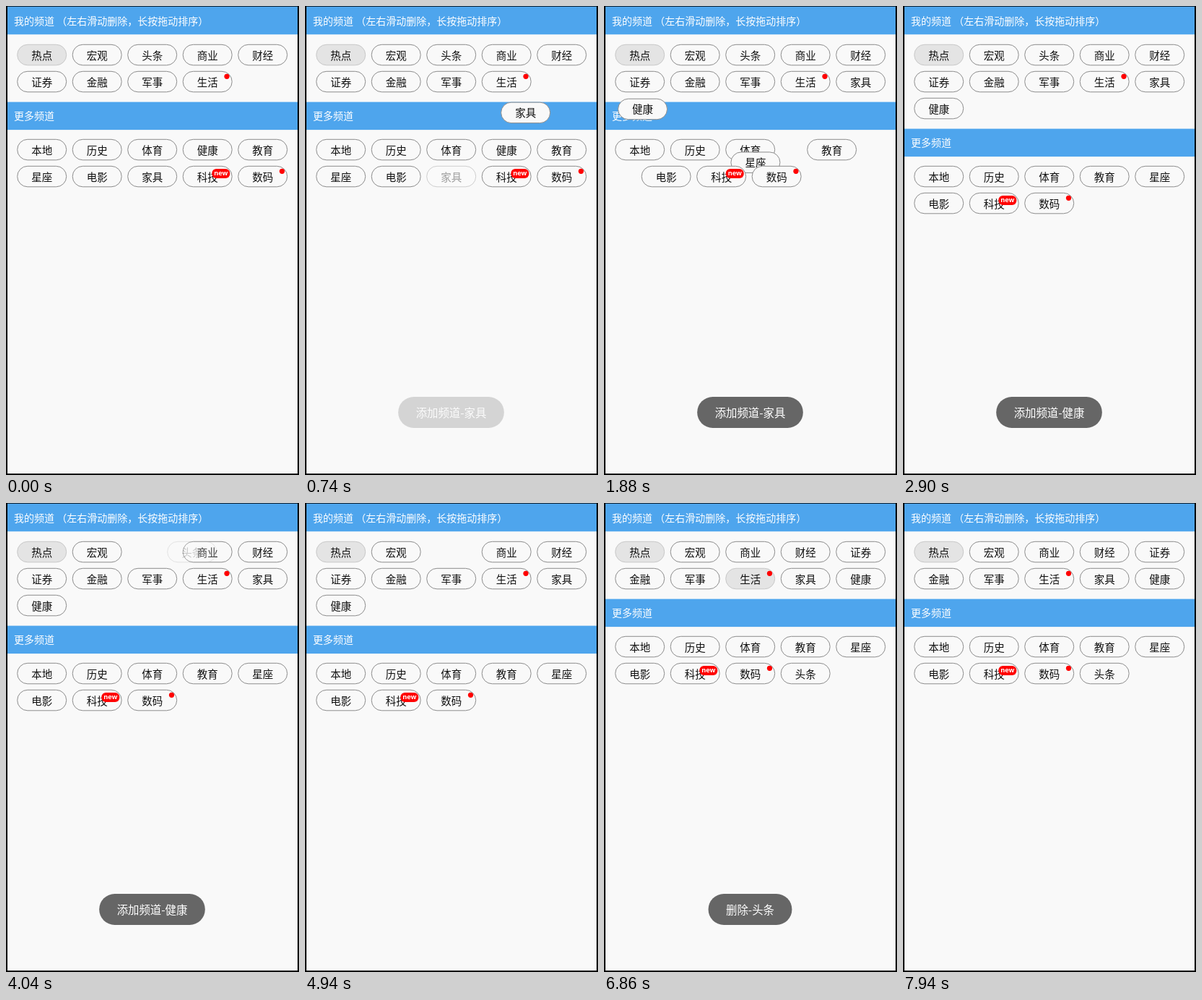
Recreate the animation shown at these times as an HTML page with a canvas. Size 406 by 648 pixels, loop 8 s.

```html
<!DOCTYPE html>
<html lang="zh-CN">
<head>
<meta charset="utf-8">
<style>
html, body { margin: 0; height: 100%; overflow: hidden; background: #000; }
canvas { display: block; }
</style>
</head>
<body>
<canvas id="stage" width="406" height="648"></canvas>
<script>
const ctx = document.getElementById('stage').getContext('2d');
const LOOP = 8000, FADE = 120, MOVE = 400;
const CHIP_W = 69, CHIP_H = 29.5, MY_TOP = 52.8, HEADER_H = 38.5;
const BG = '#f9f9f9', BLUE = '#4ea5ed', RED = '#f00';
const FONT = '"Noto Sans CJK SC", "Noto Sans CJK", sans-serif';

const words = s => s.split(' ');
// Each stage: start time and the list's contents from then on.
const mine = [
  [0, words('热点 宏观 头条 商业 财经 证券 金融 军事 生活')],
  [896, words('热点 宏观 头条 商业 财经 证券 金融 军事 生活 家具')],
  [1914, words('热点 宏观 头条 商业 财经 证券 金融 军事 生活 家具 健康')],
  [5420, words('热点 宏观 商业 财经 证券 金融 军事 生活 家具 健康')],
];
const more = [
  [0, words('本地 历史 体育 健康 教育 星座 电影 家具 科技 数码')],
  [673, words('本地 历史 体育 健康 教育 星座 电影 科技 数码')],
  [1555, words('本地 历史 体育 教育 星座 电影 科技 数码')],
  [5420, words('本地 历史 体育 教育 星座 电影 科技 数码 头条')],
];

const progress = (t, start, length) => Math.min(1, Math.max(0, (t - start) / length));
const ease = p => (1 - Math.cos(Math.PI * p)) / 2;
const mix = (a, b, p) => a + (b - a) * p;
const between = (a, b, p) => [mix(a[0], b[0], p), mix(a[1], b[1], p)];
const slot = (i, top) => [15.2 + 76.5 * (i % 5), top + 37 * Math.floor(i / 5)];
const headerTop = rows => 58.6 + 37 * rows;
const moreTop = rows => headerTop(rows) + 51.2;

function pill(x, y, w, h, r, fill, stroke) {
  ctx.beginPath();
  ctx.roundRect(x, y, w, h, r);
  ctx.fillStyle = fill;
  ctx.fill();
  if (stroke) {
    ctx.strokeStyle = stroke;
    ctx.stroke();
  }
}

function text(s, x, y, size, color, align = 'center', font = FONT, weight = 400) {
  ctx.font = `${weight} ${size}px ${font}`;
  ctx.textAlign = align;
  ctx.fillStyle = color;
  ctx.fillText(s, x, y + size * 0.38);
}

function chip(name, [x, y], alpha = 1, pressed = false) {
  const grey = pressed || name === '热点';
  ctx.globalAlpha = alpha;
  pill(x + 0.5, y + 0.5, CHIP_W - 1, CHIP_H - 1, 14.2, grey ? '#e4e4e4' : BG, grey ? '#c8c8c8' : '#8c8c8c');
  text(name, x + 34.5, y + 15.2, 14.5, '#111');
  if (name === '生活' || name === '数码') {
    ctx.beginPath();
    ctx.arc(x + 61.3, y + 7.5, 3.6, 0, 7);
    ctx.fillStyle = RED;
    ctx.fill();
  }
  if (name === '科技') {
    pill(x + 40.6, y + 4.1, 25, 13, 6, RED);
    text('new', x + 53.1, y + 9.6, 9.2, '#fff', 'center', '"Noto Sans", sans-serif', 600);
  }
  ctx.globalAlpha = 1;
}

function header(label, y) {
  ctx.fillStyle = BLUE;
  ctx.fillRect(2, y, 402, HEADER_H);
  text(label, 11, y + 19.4, 14, '#fff', 'left');
}

const stageAt = (stages, t) => stages.findLastIndex(s => s[0] <= t);

// Removed chips fade out first, then the others slide to their new slots.
function list(stages, t, top, hidden, pressed) {
  const i = stageAt(stages, t), [start, now] = stages[i];
  const before = i ? stages[i - 1][1] : now;
  const removed = before.filter(n => !now.includes(n));
  const p = ease(progress(t, start + FADE, MOVE));
  const fade = 1 - ease(progress(t, start, FADE));
  for (const name of removed)
    if (name !== hidden && fade > 0) chip(name, slot(before.indexOf(name), top), fade);
  now.forEach((name, to) => {
    if (name === hidden) return;
    const from = before.includes(name) ? before.indexOf(name) : to;
    chip(name, between(slot(from, top), slot(to, top), p), 1, name === pressed);
  });
}

function fly(name, t, start, from, to) {
  if (t < start || t >= start + MOVE) return;
  chip(name, between(slot(from, moreTop(2)), slot(to, MY_TOP), ease(progress(t, start, MOVE))));
}

function swipe(t) {
  if (t < 3590 || t > 4700) return;
  const dx = 55 * ease(progress(t, 3590, 450)) + 14 * progress(t, 4430, 220);
  const [x, y] = slot(2, MY_TOP);
  chip('头条', [x + dx, y], 1 - dx / CHIP_W);
}

// The label stays white while the dark pill fades against the light page.
function toast(label, alpha, labelAlpha = 1) {
  if (alpha <= 0) return;
  ctx.font = `15.4px ${FONT}`;
  const w = ctx.measureText(label).width + 49;
  ctx.globalAlpha = alpha;
  pill(202.5 - w / 2, 540, w, 43, 21.5, '#666');
  ctx.globalAlpha = labelAlpha;
  text(label, 202.5, 562, 15.4, mixedWhite(alpha));
  ctx.globalAlpha = 1;
}

const mixedWhite = alpha => {
  const v = Math.round(mix(249, 255, alpha));
  return `rgb(${v}, ${v}, ${v})`;
};

const toastAlpha = (t, show, hide) =>
  (1 - (1 - progress(t, show, 500)) ** 2) * (1 - progress(t, hide, 500) ** 2);

function draw(t) {
  ctx.fillStyle = '#000';
  ctx.fillRect(0, 0, 406, 648);
  ctx.fillStyle = BG;
  ctx.fillRect(2, 1, 402, 645);

  const rows = Math.ceil(mine[stageAt(mine, t)][1].length / 5);
  header('我的频道 （左右滑动删除，长按拖动排序）', 0.8);
  list(mine, t, MY_TOP, t >= 3590 ? '头条' : '', t >= 6860 && t < 7220 ? '生活' : '');
  swipe(t);
  header('更多频道', headerTop(rows));
  list(more, t, moreTop(rows));
  fly('家具', t, 496, 7, 9);
  fly('健康', t, 1514, 3, 10);

  const added = toastAlpha(t, 673, 4430), swap = progress(t, 2500, 400);
  if (swap < 1) toast('添加频道-家具', added);
  toast('添加频道-健康', added * swap, swap);
  toast('删除-头条', toastAlpha(t, 5545, 7440));
}

function tick() {
  draw(performance.now() % LOOP);
  requestAnimationFrame(tick);
}
tick();
</script>
</body>
</html>
```
